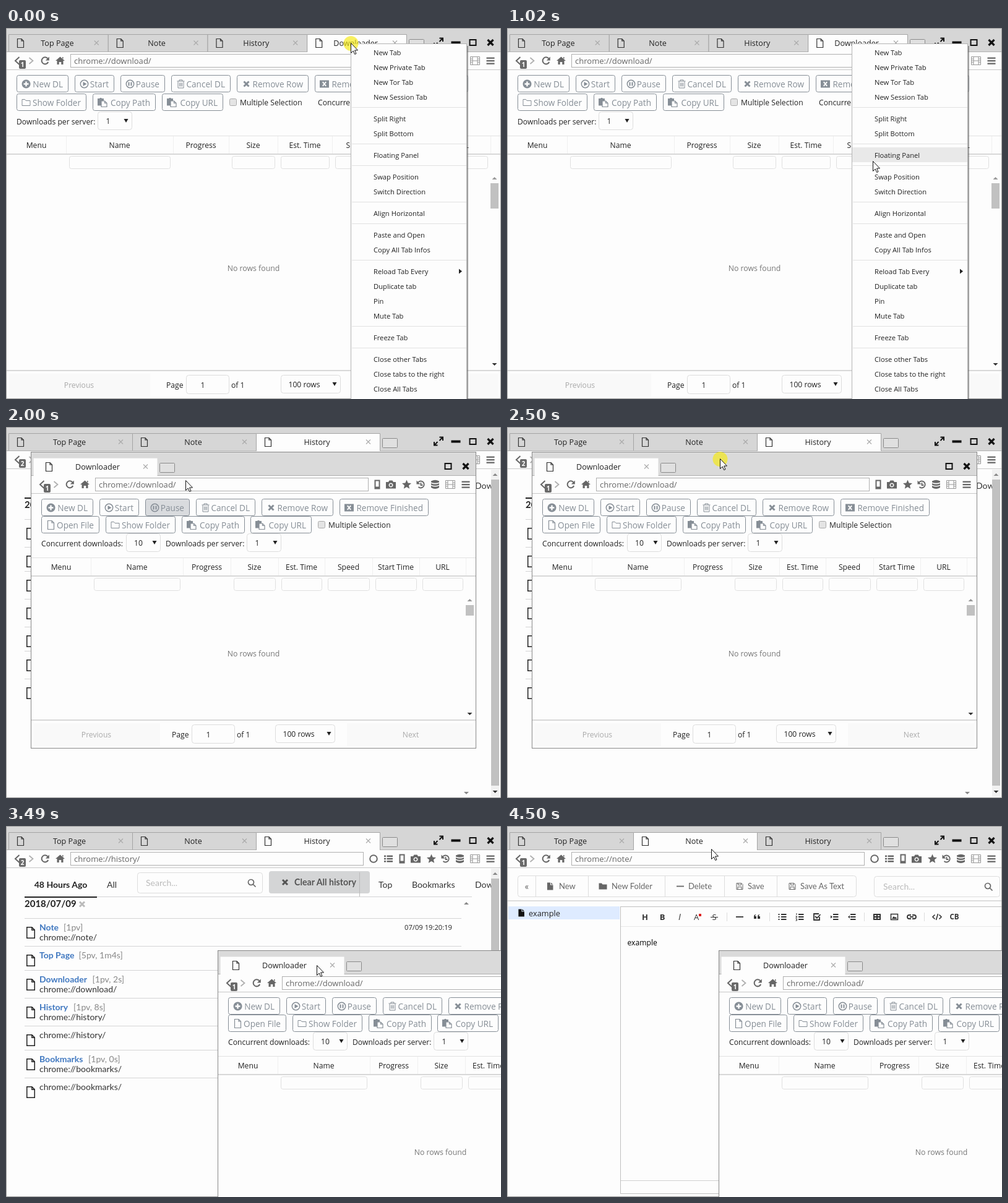
An HTML page that plays this animation: 800 px wide and 600 px high, repeating every 5990 ms.

```html
<!DOCTYPE html>
<html lang="en">
<head>
<meta charset="utf-8">
<title>Floating panel</title>
<style>
html, body { margin: 0; width: 100%; height: 100%; overflow: hidden; background: #fdfdfd; }
svg { display: block; position: absolute; left: 0; top: 0; }
text { font-family: "Open Sans", "Noto Sans", sans-serif; white-space: pre; }
.lato { font-family: Lato, sans-serif; }
.bold { font-weight: 700; }
.mid { text-anchor: middle; }
.end { text-anchor: end; }
.step { animation: 5990ms step-end infinite; }
#start { animation-name: start; }
#history { animation-name: history; }
#note { animation-name: note; }
#panel { animation-name: panel; }
.body { animation-name: nudge; }
.hover { animation-name: hover; }
#row { animation-name: row; }
#cursor { animation-name: cursor; }
#press { animation-name: press; }
@keyframes start { 0% { opacity: 1 } 25.209%, 100% { opacity: 0 } }
@keyframes history { 0% { opacity: 0 } 25.209% { opacity: 1 } 75.125%, 100% { opacity: 0 } }
@keyframes note { 0% { opacity: 0 } 75.125%, 100% { opacity: 1 } }
@keyframes panel {
  0% { opacity: 0; transform: translate(0, 0) }
  25.209% { opacity: 1; transform: translate(0, 0) }
  50.25%, 100% { opacity: 1; transform: translate(302px, 161px) }
}
@keyframes nudge { 0% { transform: translate(0, 0) } 50.25% { transform: translate(1px, 0) } 58.264%, 100% { transform: translate(0, 0) } }
@keyframes hover { 0% { opacity: 0 } 33.389% { opacity: .3 } 41.736%, 100% { opacity: 0 } }
@keyframes row {
  0% { opacity: 0; transform: translate(0, 51px) }
  8.347% { opacity: 1; transform: translate(0, 51px) }
  17.028%, 100% { opacity: 1; transform: translate(0, 193px) }
}
@keyframes cursor {
  0% { transform: translate(557px, 24px) }
  8.347% { transform: translate(564px, 55px) }
  17.028% { transform: translate(591px, 215px) }
  33.389% { transform: translate(290px, 86px) }
  41.736% { transform: translate(344px, 51px) }
  50.25% { transform: translate(646px, 213px) }
  58.264% { transform: translate(502px, 225px) }
  66.945%, 100% { transform: translate(330px, 37px) }
}
@keyframes press { 0% { opacity: .66 } 8.347% { opacity: 0 } 41.736% { opacity: .66 } 58.264%, 100% { opacity: 0 } }
</style>
</head>
<body>
<svg id="stage" width="800" height="600" viewBox="0 0 800 600"></svg>
<script>
const PAGE = '#fdfdfd', BAR = '#d6d6d6', GREY = '#868e96', DARK = '#666';

const box = (x, y, w, h, fill, stroke = 'none', r = 0) =>
  `<rect x="${x}" y="${y}" width="${w}" height="${h}" rx="${r}" fill="${fill}" stroke="${stroke}"/>`;
const frame = (x, y, w, h, stroke = '#ddd', r = 4, fill = PAGE) => box(x + .5, y + .5, w - 1, h - 1, fill, stroke, r);
const hline = (x1, x2, y, color = '#ddd', h = 1) => box(x1, y, x2 - x1, h, color);
const vline = (x, y1, y2, color = '#ddd') => box(x, y1, 1, y2 - y1, color);
// y is the visual middle of the line of text
const text = (x, y, s, cls = '', size = 12.15, fill = '#222') =>
  `<text x="${x}" y="${(y + size * .36).toFixed(2)}" class="${cls}" font-size="${size}" fill="${fill}">${s}</text>`;
const lato = (x, y, s, cls = '', size = 14, fill = '#333') => text(x, y, s, 'lato ' + cls, size, fill);
const tri = (x, y, d, fill = '#333') => `<path d="M${x - 4} ${y - 2 * d}h8l-4 ${4 * d}z" fill="${fill}"/>`;

const line = (d, w = 1.5) => `<path d="${d}" fill="none" stroke="currentColor" stroke-width="${w}"/>`;
const solid = d => `<path d="${d}" fill="currentColor" fill-rule="evenodd"/>`;
const ring = (r, w = 1.5) => `<circle r="${r}" fill="none" stroke="currentColor" stroke-width="${w}"/>`;
const bars = 'M-2-5H6.5v2H-2zM-2-1H6.5v2H-2zM-2 3H6.5v2H-2z';
const shapes = {
  doc: line('M-5-7H1.5L5-3.5V7H-5zM1.5-7v3.5H5', 1.2),
  docFill: solid('M-5-6H0v4h4.5V6H-5zM1-6L4.5-3H1z'),
  back: line('M3.5-6L-3 0L3.5 6', 2),
  next: line('M-3-5L3 0L-3 5', 1.8),
  reload: line('M4.5-3.5A5.5 5.5 0 1 0 5.2 2', 2) + solid('M6.8-6.5v6h-6z'),
  home: solid('M0-6.5L7.5 0H5v6H1.8V2h-3.6v4H-5V0h-2.5zM3.5-6H5v3L3.5-4z'),
  circle: ring(5.8, 2),
  list: solid('M-7-5.5h3v2.5h-3zM-7-1.2h3v2.5h-3zM-7 3h3v2.5h-3zM-2.5-5.5H7V-3h-9.5zM-2.5-1.2H7v2.5h-9.5zM-2.5 3H7v2.5h-9.5z'),
  mobile: line('M-3.5-6.5h7v13h-7z', 2) + solid('M-3 3.5h6v3h-6z'),
  camera: solid('M-8-4h4l1.5-2.5h5L4-4h4V6.5H-8zM0-2.5a3.5 3.5 0 1 0 .1 0z') + '<circle cy="1" r="2" fill="currentColor"/>',
  star: solid('M0-7.5L2.2-2.5L7.5-2L3.5 1.5L4.7 6.7L0 4L-4.7 6.7L-3.5 1.5L-7.5-2L-2.2-2.5z'),
  clock: line('M-4.5-3.5A5.5 5.5 0 1 1-4 4M0-3V1H3', 1.8) + solid('M-7-6.5v6h6z'),
  data: solid('M-6.5-5.5Q0-9 6.5-5.5v2Q0-1-6.5-3.5zM-6.5-2Q0 1 6.5-2V.5Q0 3.5-6.5 .5zM-6.5 2Q0 5 6.5 2v3Q0 9-6.5 5z'),
  film: line('M-7.5-6.5h15v13h-15zM-4-6.5v13M4-6.5v13M-4 0h8M-7-3h3M-7 0h3M-7 3h3M4-3h3M4 0h3M4 3h3', 1),
  menu: solid('M-6.5-5.5h13v2.2h-13zM-6.5-1h13v2.2h-13zM-6.5 3.5h13v2.2h-13z'),
  expand: line('M1.5-6.5H7V-1M7-6.5L1.5-1M-1.5 6.5H-7V1M-7 6.5L-1.5 1', 2),
  min: solid('M-7.5-1.5h15v4h-15z'),
  max: line('M-5-4.5H5v9H-5z', 2),
  close: line('M-4.5-4.5L4.5 4.5M4.5-4.5L-4.5 4.5', 3.2),
  x: line('M-3.5-3.5L3.5 3.5M3.5-3.5L-3.5 3.5', 1.1),
  cross: line('M-4-4L4 4M4-4L-4 4', 3),
  plus: solid('M0-7a7 7 0 1 0 .1 0zM-1.2-4h2.4v2.8H4v2.4H1.2V4h-2.4V1.2H-4v-2.4h2.8z'),
  play: ring(6.2) + solid('M-2-3.5L4 0L-2 3.5z'),
  pause: ring(6.2) + line('M-2-3v6M2-3v6', 2),
  trash: line('M-6-4.5H6M-2.5-4.5v-2h5v2M-4.5-4V6.5h9V-4M-2-2v6M0-2v6M2-2v6', 1),
  crossBox: solid('M-7.5-6h15v12h-15zM-3.5-2.5L-1 0L-3.5 2.5L-2 4L0 1.5L2 4L3.5 2.5L1 0L3.5-2.5L2-4L0-1.5L-2-4z'),
  folder: line('M-6.5-5h4.5l1.5 2h7V5h-13z', 1),
  folderFill: solid('M-6.5-5H-2l1.5 2h7V5h-13z'),
  paste: solid('M-7.5-6.5h3l1-1h2l1 1h3V5h-10z') + `<path d="M-1.5-2.5H4L7.5 1V7h-9z" fill="${PAGE}" stroke="currentColor" stroke-width="1.2"/>` + line('M4-2.5V1h3.5', 1.2),
  save: line('M-5-5H3L5-3V5H-5zM-2.5-5v3h5v-3M-3 5V1h6v4', 1),
  search: line('M-5.5-1a4.5 4.5 0 1 0 9 0a4.5 4.5 0 1 0-9 0M2.5 2.5L6.5 6.5', 1.7),
  minus: line('M-6 0H6', 1.8),
  quote: solid('M-5 0Q-5-4-1.5-4Q-3-3-3-1H-1V3h-4zM1 0Q1-4 4.5-4Q3-3 3-1H5V3H1z'),
  ul: solid('M-6.5-5h2v2h-2zM-6.5-1h2v2h-2zM-6.5 3h2v2h-2z' + bars),
  ol: solid(bars) + line('M-5-6v3M-6.5-1h2v2h-2M-6.5 3h2v3h-2', 1),
  check: line('M4 0V5H-5V-5H3M-3-1L0 2L5.5-4', 1.8),
  indent: solid('M-6-2.5L-3 0L-6 2.5z' + bars),
  outdent: solid('M-3-2.5L-6 0L-3 2.5z' + bars),
  table: solid('M-6-5H6V5H-6zM-4-3v2h3v-2zM1-3v2h3v-2zM-4 1v2h3V1zM1 1v2h3V1z'),
  image: line('M-5.5-4.5h11v9h-11z') + solid('M-4 3L-1-1L1 1L2.5 0L4 3z'),
  link: line('M-1-3h-3a3 3 0 0 0 0 6h3M1-3h3a3 3 0 0 1 0 6H1M-3 0h6', 1.8),
  code: line('M-3.5-3.5L-7 0L-3.5 3.5M3.5-3.5L7 0L3.5 3.5M1.5-5L-1.5 5', 1.6)
};
const icon = (name, x, y, color = DARK, scale = 1) =>
  `<g transform="translate(${x} ${y}) scale(${scale})" color="${color}">${shapes[name]}</g>`;

function chrome({ w, tabs, on, tabW, url, badge, mini }) {
  let s = box(0, 0, w, 39, mini ? '#dadada' : BAR) + box(0, 39, w, 28, PAGE) + hline(0, w, 38, '#b0b0b0') + hline(0, w, 67, '#c8c8c8');
  tabs.forEach((name, i) => {
    const x = 4 + i * tabW, open = i === on, bottom = open ? 39 : 38;
    s += `<path d="M${x + .5} ${bottom}V10.5h${tabW}V${bottom}" fill="${open ? PAGE : BAR}" stroke="${mini ? 'none' : '#a4a4a4'}"/>` +
      icon('doc', x + (mini ? 25.5 : 19.5), 24.5, '#333') +
      text(x + tabW / 2 + (mini ? 4 : -1.5), 24, name, 'mid', 12.6) +
      icon('x', x + tabW - 18.5, 24, '#aaa');
  });
  s += frame(8 + tabs.length * tabW, 18, 25, 16, '#8a8a8a', 1, '#e0e0e0');
  if (!mini) s += icon('expand', w - 101, 23, '#111') + icon('min', w - 73, 23, '#111');
  s += icon('max', w - 45.5, 23.5, '#111') + icon('close', w - 17, 23.5, '#111');
  s += icon('back', 18, 53) + box(21, 52, 11, 14, '#6a6a6a', 'none', 2) + text(26.5, 59, badge, 'mid bold', 10, '#fff') +
    icon('next', 40.5, 53, '#b0b0b0') + icon('reload', 63, 53) + icon('home', 87.5, 53);
  s += frame(104, 42, w - (mini ? 174 : 222) - 104, 22, '#b0b0b0', 0) + text(110, 53, url, '', 13.05, DARK);
  if (!mini) s += icon('circle', w - 206, 53) + icon('list', w - 182, 53);
  ['mobile', 'camera', 'star', 'clock', 'data', 'film', 'menu'].forEach((n, i) => {
    s += icon(n, w - [160, 138, 112.5, 89.5, 66.5, 42, 17][i], 53, n === 'film' ? '#999' : DARK);
  });
  return s;
}

const select = (x, y, w, label, cx) =>
  frame(x, y, w, 30) + text(x + cx, y + 15.5, label, 'mid') + `<path d="M${x + w - 13.5} ${y + 12}h7l-3.5 6z" fill="#222"/>`;

const buttons = [
  ['New DL', 'plus', 84], ['Start', 'play', 64], ['Pause', 'pause', 72], ['Cancel DL', 'trash', 96], ['Remove Row', 'cross', 116],
  ['Remove Finished', 'crossBox', 144], ['Open File', 'doc', 93.8], ['Show Folder', 'folder', 112.9], ['Copy Path', 'paste', 101.6], ['Copy URL', 'paste', 99]
];
function buttonRow(list, y) {
  let x = 17;
  return list.map(([label, name, width]) => {
    const a = Math.round(x), w = Math.round(width);
    x += width + 10;
    return frame(a, y, w, 28, GREY, 3) + icon(name, a + 15.5, y + 14.5, GREY) + text(a + w - 9, y + 15, label, 'end', 13.6, GREY);
  }).join('');
}

const heads = ['Menu', 'Name', 'Progress', 'Size', 'Est. Time', 'Speed', 'Start Time', 'URL'];
function table({ w, h, top, cols, thumb, empty, page, rows, ends }) {
  const foot = h - 47, mid = h - 22.5;
  const end = (x, cx, label) => box(x, h - 41, ends[0] * 2 - 8, 37, '#f9f9f9') + text(cx, mid, label, 'mid', 12.15, '#aaa');
  let s = hline(1, w - 1, top, '#e2e2e2') + hline(1, w - 1, top + 29, '#d8d8d8', 2);
  heads.forEach((name, i) => {
    const a = cols[i], b = cols[i + 1];
    s += text((a + b) / 2, top + 15.7, name, 'mid') + vline(b, top + 1, top + 29, '#f0f0f0');
    if (i && i !== 2) s += frame(a + 5, top + 33, b - a - 9, 21, '#e0e0e0', 3);
  });
  s += tri(w - 10.5, top + 69, -1, '#999') + box(w - 17, top + thumb[0], 13, thumb[1], '#c1c1c1') + tri(w - 10.5, h - 56, 1);
  s += text(w / 2, empty, 'No rows found', 'mid', 12.3, '#777') + hline(1, w - 1, foot, '#d8d8d8', 2);
  s += end(5, ends[0], 'Previous') + end(w - ends[0] * 2 + 3, ends[1], 'Next');
  return s + text(page, mid, 'Page') + frame(page + 32, h - 39, 70, 31) + text(page + 59, mid, '1', 'mid') +
    text(page + 105, mid, 'of 1') + select(rows, h - 39, 97, '100 rows', 38);
}
const checkbox = (x, y) => frame(x, y, 12, 12, '#aaa', 2, '#e4e4e4') + text(x + 17, y + 6.5, 'Multiple Selection');

const startPage = () => buttonRow(buttons.slice(0, 7), 76) + buttonRow(buttons.slice(7), 106) + checkbox(361, 114) +
  text(504, 120.5, 'Concurrent downloads:') + text(17, 151.5, 'Downloads per server:') + select(148, 135, 56, '1', 17) +
  table({ w: 800, h: 600, top: 174, cols: [1, 97, 270, 360, 439, 527, 607, 690, 783], thumb: [77, 41], empty: 389, page: 259, rows: 444, ends: [118, 682] });

const panelPage = () => buttonRow(buttons.slice(0, 6), 76) + `<g class="step hover">${box(185.5, 76.5, 71, 27, GREY, GREY, 3)}</g>` +
  buttonRow(buttons.slice(6), 104) + checkbox(464, 112) + text(17, 148.5, 'Concurrent downloads:') + select(154, 132, 56, '10', 20) +
  text(218, 148.5, 'Downloads per server:') + select(349, 132, 56, '1', 17) +
  table({ w: 720, h: 480, top: 171, cols: [1, 97, 246, 323, 400, 475, 552, 628, 703], thumb: [77, 17], empty: 327, page: 228, rows: 395, ends: [106, 614] });

const groups = [
  ['New Tab', 'New Private Tab', 'New Tor Tab', 'New Session Tab'], ['Split Right', 'Split Bottom'], ['Floating Panel'],
  ['Swap Position', 'Switch Direction'], ['Align Horizontal'], ['Paste and Open', 'Copy All Tab Infos'],
  ['Reload Tab Every', 'Duplicate tab', 'Pin', 'Mute Tab'], ['Freeze Tab'], ['Close other Tabs', 'Close tabs to the right', 'Close All Tabs']
];
function contextMenu() {
  let y = 39.8;
  let s = '<path d="M745 29h2V600h-2z" fill="#666" opacity=".6"/>' + box(557.5, 25.5, 187, 590, PAGE, '#b4b4b4') +
    `<g id="row" class="step">${box(558, 0, 186, 24, '#e9e9e9')}</g>`;
  groups.forEach((group, i) => {
    if (i) s += hline(559, 744, Math.floor(y - 18.5), '#e2e2e2');
    group.forEach(label => { s += text(594, y, label, '', 11.2); y += 24; });
    y += 11;
  });
  return s + '<path d="M732 389.5v8l5-4z" fill="#222"/>';
}

const visits = [
  ['Note', '[1pv]', 'note', 93], ['Top Page', '[5pv, 1m4s]', '', 117.5], ['Downloader', '[1pv, 2s]', 'download', 139.5],
  ['History', '[1pv, 8s]', 'history', 109], ['', '', 'history'], ['Bookmarks', '[1pv, 0s]', 'bookmarks', 133], ['', '', 'bookmarks']
];
function historyPage() {
  let s = lato(88.5, 95, '48 Hours Ago', 'mid bold', 14, '#222') + lato(163, 95, 'All') +
    frame(212, 75, 203, 34) + lato(226, 92, 'Search...', '', 14, '#bbb') + icon('search', 397, 92) +
    box(425, 73, 163, 36, '#d4d5d6', 'none', 4) + icon('cross', 451, 91, '#555') + lato(466, 91, 'Clear All history', 'bold', 14.2, '#555') +
    vline(571, 75, 115, '#bbb') + lato(602, 95, 'Top') + lato(656, 95, 'Bookmarks', '', 14.2) + lato(758, 95, 'Dow') +
    hline(30, 753, 114, '#d4d4d5') + hline(30, 147, 114, '#222', 2) +
    lato(30, 126, '2018/07/09', 'bold', 15, '#222') + icon('cross', 123, 126.5, '#bbb') +
    tri(744, 125, -1, '#888') + tri(744, 592, 1, '#888') + hline(30, 736, 149, '#d4d4d5') + text(721, 164, '07/09 19:20:19', 'end', 11.2);
  let y = 150;
  visits.forEach(([name, info, path, infoX], i) => {
    const two = name && path;
    s += icon('doc', 40, y + 22.5, '#222', 1.25);
    if (name) s += lato(54, y + 14, name, 'bold', 14, '#4078c0') + lato(infoX, y + 14, info, '', 14, '#888');
    if (path) s += lato(54, y + (two ? 30 : 14), `chrome://${path}/`);
    y += two ? 45 : 39;
    if (i < visits.length - 1) s += hline(30, 736, y - 1, '#d4d4d5');
  });
  return s + box(784, 69, 13, 529, '#f1f1f1') + tri(790.5, 77, -1, '#888') + box(784, 85, 13, 495, '#c1c1c1') + tri(790.5, 590, 1);
}

function notePage() {
  let s = frame(17, 80, 548, 35) + [46, 131, 255, 351, 436].map(x => vline(x, 81, 114)).join('') + lato(32, 97, '«', 'mid', 16, DARK);
  [['docFill', 70, 'New', 84], ['folderFill', 155, 'New Folder', 169], ['minus', 280, 'Delete', 293], ['save', 376, 'Save', 389], ['save', 461, 'Save As Text', 474]]
    .forEach(([name, iconX, label, x]) => { s += icon(name, iconX, 97.5) + lato(x, 97.5, label, '', 13, DARK); });
  s += frame(593, 81, 204, 34) + lato(608, 98, 'Search...', '', 14, '#bbb') + icon('search', 778, 98) + hline(1, 799, 120, '#ddd', 2);
  s += box(2, 130, 180, 21, '#deebff') + icon('docFill', 23.5, 140.5, '#111') + text(35, 141.5, 'example', '', 12.8) +
    frame(183, 130, 640, 465, '#c0c0c0', 0) + hline(184, 799, 162, '#e8e8e8') + hline(184, 799, 573, '#d0d0d0');
  const glyph = (x, c, cls = 'bold', size = 13) => text(x, 147, c, 'mid ' + cls, size, '#333');
  s += glyph(223, 'H') + glyph(251, 'B') + glyph(279, '<tspan font-style="italic">I</tspan>', '', 14) +
    glyph(306, 'A', '') + box(310, 142, 4, 4, '#d22') + glyph(335, 'S', '') + hline(329, 341, 147, '#333') + glyph(723, 'CB', 'bold', 11.5);
  s += [355, 424, 577, 674].map(x => vline(x, 140, 154)).join('');
  let x = 376;
  for (const name of ['minus', 'quote', '', 'ul', 'ol', 'check', 'indent', 'outdent', '', 'table', 'image', 'link', '', 'code']) {
    if (name) s += icon(name, x, 147, '#333');
    x += name ? 28 : 13;
  }
  return s + text(194.5, 188.5, 'example', '', 12.15, '#000');
}

const browser = opts => box(0, 0, 800, 600, PAGE) + chrome({ w: 800, tabs: ['Top Page', 'Note', 'History'], tabW: 200, ...opts });
const edge = (w, h, color) => box(.5, .5, w - 1, h - 1, 'none', color);
const layer = (id, s) => `<g id="${id}" class="step">${s}</g>`;
const panel = box(0, 0, 720, 480, PAGE) +
  chrome({ w: 720, tabs: ['Downloader'], on: 0, tabW: 200, url: 'chrome://download/', badge: 1, mini: true }) +
  `<g class="step body">${panelPage()}</g>` + edge(720, 480, '#888');

document.getElementById('stage').innerHTML =
  layer('start', browser({ tabs: ['Top Page', 'Note', 'History', 'Downloader'], on: 3, tabW: 160.75, url: 'chrome://download/', badge: 1 }) +
    startPage() + edge(800, 600, '#999') + contextMenu()) +
  layer('history', browser({ on: 2, url: 'chrome://history/', badge: 2 }) + historyPage() + edge(800, 600, '#999')) +
  layer('note', browser({ on: 1, url: 'chrome://note/', badge: 1 }) + notePage() + edge(800, 600, '#999')) +
  layer('panel', `<g transform="translate(40 40)">${panel}</g>`) +
  layer('cursor', '<circle id="press" class="step" cx=".5" cy="1" r="12" fill="#f6ea10"/>' +
    '<path d="M.5 .5V16.5L4.2 13L6.7 18.5L9 17.5L6.6 12H11.5z" fill="#fff" stroke="#111"/>');
</script>
</body>
</html>
```
